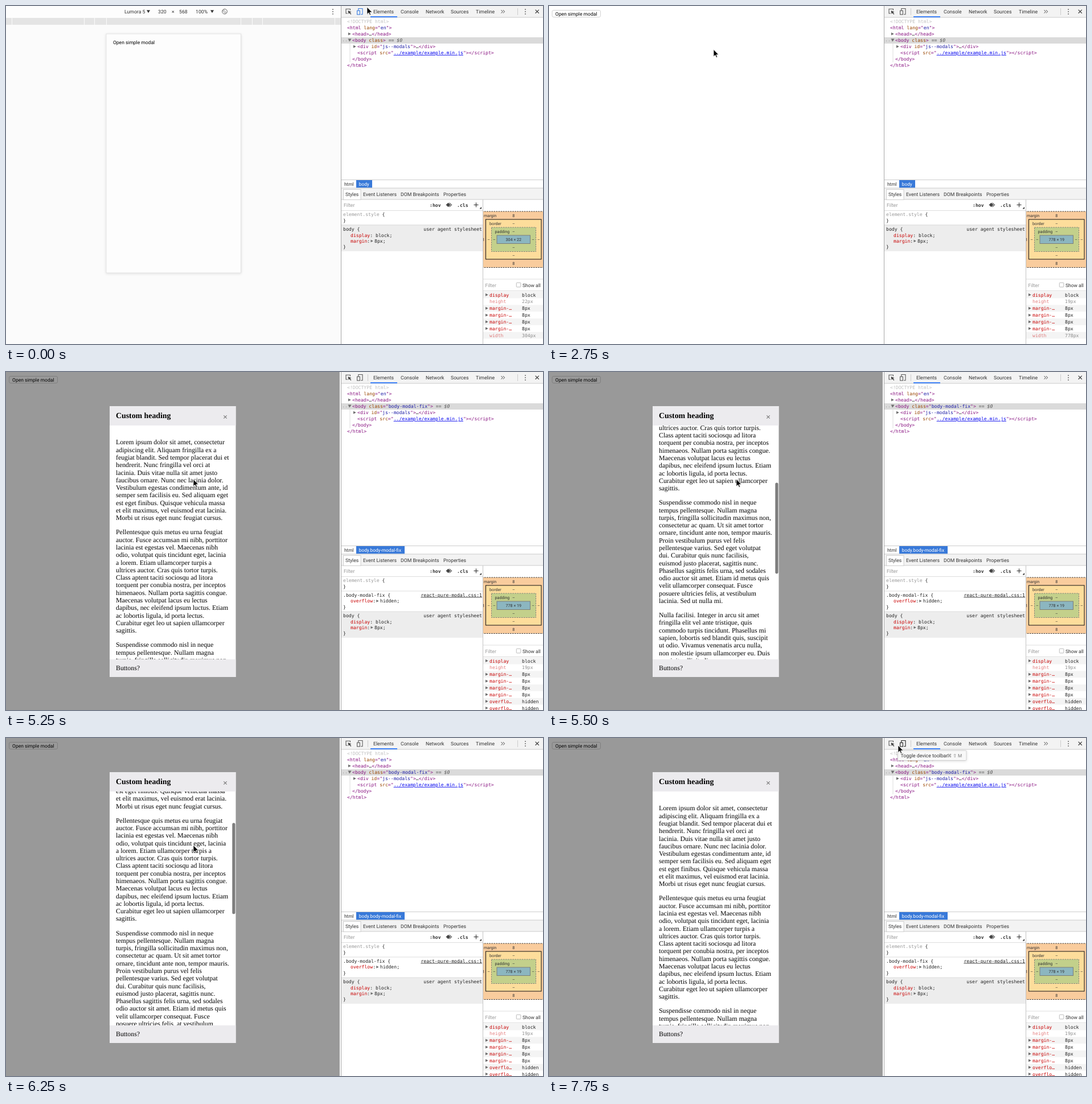
An HTML page that plays this animation: 943 px wide and 594 px high, repeating every 8 s.

```html
<!DOCTYPE html>
<html lang="en">
<head>
<meta charset="utf-8">
<title>Modal demo</title>
<style>
  html, body { margin: 0; width: 100%; height: 100%; overflow: hidden; background: #fff; }
  svg { display: block; width: 943px; height: 594px; }
  text { white-space: pre; text-rendering: geometricPrecision; font: 8.7px Roboto, "Liberation Sans", sans-serif; fill: #333; }
  .mono { font: 8.13px "DejaVu Sans Mono", "Liberation Mono", monospace; fill: #222; }
  .serif { font: 11.82px "Liberation Serif", "Noto Serif", serif; fill: #000; }
  .box { font-size: 7.2px; }
  .crumb { font-size: 8.3px; }
  .mid { text-anchor: middle; }
  .end { text-anchor: end; }
  .tag { fill: #881280; }
  .name { fill: #994500; }
  .val { fill: #1a1aa6; }
  .link { fill: #0000ee; text-decoration: underline; }
  .prop { fill: #c80000; }
  .dim { fill: #999; }
  .faint { fill: #c0c0c0; }
  .ital { fill: #555; font-style: italic; }
  .bold { font-weight: bold; }
</style>
</head>
<body>
<svg id="stage" viewBox="0 0 943 594"></svg>
<script>
const LOOP = 8000;
const ROW = 11.08, LINE = 13.29, GAP = 11.82, THUMB_RATIO = 2.515;

// [ms, x, y]
const CURSOR = [
  [0, 634, 2], [250, 616.5, 14], [500, 616.5, 13.5], [2500, 499.5, 60], [2750, 289, 76.5],
  [4250, 286.5, 76.5], [4500, 285.5, 76.5], [4750, 203.5, 54.5], [5000, 331, 174.5],
  [5250, 329, 188.5], [6750, 385.5, 147], [7000, 571.5, 38.5], [7250, 613, 13]
];
// [ms, offset]
const SCROLL = [[0, 0], [5500, 250], [5750, 598.7], [6000, 480], [6250, 136.7], [6500, 0]];

const PARAS = [
  `Lorem ipsum dolor sit amet, consectetur|adipiscing elit. Aliquam fringilla ex a|feugiat blandit. Sed tempor placerat dui et|hendrerit. Nunc fringilla vel orci at|lacinia. Duis vitae nulla sit amet justo|faucibus ornare. Nunc nec lacinia dolor.|Vestibulum egestas condimentum ante, id|semper sem facilisis eu. Sed aliquam eget|est eget finibus. Quisque vehicula massa|et elit maximus, vel euismod erat lacinia.|Morbi ut risus eget nunc feugiat cursus.`,
  `Pellentesque quis metus eu urna feugiat|auctor. Fusce accumsan mi nibh, porttitor|lacinia est egestas vel. Maecenas nibh|odio, volutpat quis tincidunt eget, lacinia|a lorem. Etiam ullamcorper turpis a|ultrices auctor. Cras quis tortor turpis.|Class aptent taciti sociosqu ad litora|torquent per conubia nostra, per inceptos|himenaeos. Nullam porta sagittis congue.|Maecenas volutpat lacus eu lectus|dapibus, nec eleifend ipsum luctus. Etiam|ac lobortis ligula, id porta lectus.|Curabitur eget leo ut sapien ullamcorper|sagittis.`,
  `Suspendisse commodo nisl in neque|tempus pellentesque. Nullam magna|turpis, fringilla sollicitudin maximus non,|consectetur ac quam. Ut sit amet tortor|ornare, tincidunt ante non, tempor mauris.|Proin vestibulum purus vel felis|pellentesque varius. Sed eget volutpat|dui. Curabitur quis nunc facilisis,|euismod justo placerat, sagittis nunc.|Phasellus sagittis felis urna, sed sodales|odio auctor sit amet. Etiam id metus quis|velit ullamcorper consequat. Fusce|posuere ultricies felis, at vestibulum|lacinia. Sed ut nulla mi.`,
  `Nulla facilisi. Integer in arcu sit amet|fringilla elit vel ante tristique, quis|commodo turpis tincidunt. Phasellus mi|sapien, lobortis sed blandit quis, suscipit|ut odio. Vivamus venenatis arcu nulla,|non molestie ipsum ullamcorper eu. Duis|suscipit sollicitudin purus, eu consequat|magna fringilla eget. Sed a varius dui.|Donec at nisi tortor. Vivamus ultrices|risus eu maximus fermentum. Curabitur|et tempus turpis. Curabitur tincidunt|porttitor imperdiet. Pellentesque hendrerit|finibus mi, et rhoncus ex vestibulum nec.|Integer fermentum quis elit eget faucibus.`,
  `Ut bibendum dolor a mi ultrices venenatis|ac a mi. Sed imperdiet ipsum sodales|odio scelerisque, vel lobortis est rutrum.|Sed sagittis iaculis lorem id mattis. Sed|ultricies condimentum rhoncus. Phasellus|rhoncus turpis nec odio egestas, quis|pellentesque quam aliquam. In sodales|erat iaculis libero molestie, vel commodo|nisl congue. Maecenas scelerisque, ligula|et elementum sagittis, felis dui semper|tortor, eget euismod enim enim vitae ante.|Nullam suscipit accumsan mi non blandit.|Curabitur viverra risus sed feugiat|aliquet. Pellentesque habitant morbi|tristique senectus et netus et malesuada|fames ac turpis egestas. Aliquam ipsum|diam, pulvinar sit amet lectus at, congue|vulputate eros. Donec id libero quam.`
];

const esc = s => s.replace(/&/g, '&amp;').replace(/</g, '&lt;').replace(/>/g, '&gt;');
const span = (cls, s) => `<tspan class="${cls}">${esc(s)}</tspan>`;
const tag = s => span('tag', s);
const raw = (x, y, inner, cls = '', more = '') => `<text x="${x}" y="${y}" class="${cls}" ${more}>${inner}</text>`;
const text = (x, y, s, cls, more) => raw(x, y, esc(s), cls, more);
const mono = (x, y, inner, cls = '') => raw(x, y, inner, 'mono ' + cls);
const rect = (x, y, w, h, fill, more = '') => `<rect x="${x}" y="${y}" width="${w}" height="${h}" fill="${fill}" ${more}/>`;
const path = (d, fill, more = '') => `<path d="${d}" fill="${fill}" ${more}/>`;
const hline = (x, y, w, c = '#ccc') => rect(x, y, w, 1, c);
const vline = (x, y, h, c = '#ccc') => rect(x, y, 1, h, c);
const right = (x, y, s = 5) => path(`M${x} ${y - s / 2}v${s}l${s * .95} ${-s / 2}z`, '#6e6e6e');
const down = (x, y, s = 6, c = '#6e6e6e') => path(`M${x} ${y - s / 2.4}h${s}l${-s / 2} ${s * .85}z`, c);
const dots = (x, c = '#555') => [6, 10, 14].map(y => rect(x - .8, y - .8, 1.6, 1.6, c)).join('');
const during = (from, to, inner) => `<g data-from="${from}" data-to="${to}">${inner}</g>`;

function devicePage() {
  const ticks = [10, 137, 155, 176, 412, 432, 450, 577];
  return rect(0, 0, 588, 594, '#fbfbfb') + rect(0, 0, 588, 20, '#fdfdfd') +
    text(208, 13, 'Lumora 5') + down(247, 9.7, 6, '#333') +
    text(267, 13, '320') + text(291, 13, '×') + text(304, 13, '568') +
    text(333, 13, '100%') + down(359, 9.7, 6, '#333') +
    `<circle cx="384" cy="9.7" r="4.4" fill="none" stroke="#666"/>` +
    path('M382 6.8l4.6 4.2l-1.6 1.6l-4.6 -4.2z', '#fdfdfd', 'stroke="#666" stroke-width=".8"') +
    dots(574) + rect(0, 21, 588, 12, '#e4e4e4') +
    ticks.map(x => vline(x, 21, 12, '#fafafa')).join('') +
    rect(176, 49, 236.5, 420, '#fdfdfd', 'stroke="#dcdcdc" stroke-width=".8" filter="url(#soft)"') +
    text(188, 66.6, 'Open simple modal', '', 'style="font-size:8.5px;fill:#000"');
}

const plainPage = () => rect(0, 0, 588, 594, '#fff') +
  rect(5.5, 7.5, 85, 12, '#fff', 'rx="2.5" stroke="#cfcfcf" stroke-width=".9"') +
  text(11, 16.6, 'Open simple modal', '', 'style="font-size:8.55px;fill:#000"');

function modal() {
  let y = 127.4, body = '';
  for (const para of PARAS) {
    for (const line of para.split('|')) {
      body += text(193, y.toFixed(2), line, 'serif');
      y += LINE;
    }
    y += GAP;
  }
  return rect(0, 0, 586, 594, '#000', 'opacity=".4"') +
    rect(182, 60, 221.5, 476, '#fff') +
    `<g clip-path="url(#view)"><g id="copy">${body}</g></g>` +
    rect(182, 60, 221.5, 34, '#ecebee') + rect(182, 505, 221.5, 31, '#ecebee') +
    text(193, 81, 'Custom heading', 'serif bold', 'style="font-size:13.83px"') +
    path('M382.3 76.3l5.4 5.4m0 -5.4l-5.4 5.4', 'none', 'stroke="#777" stroke-width="1.1"') +
    text(193, 524, 'Buttons?', 'serif') +
    during(5500, 7750, rect(397.3, 95, 5.2, 160, '#7d7d7d', 'rx="2.6" id="thumb"'));
}

function deviceIcon(c) {
  return path('M618.8 8V4.5h7.2v10.2h-3', 'none', `stroke="${c}" stroke-width="1.1"`) +
    rect(616.6, 8.2, 4.8, 6.8, '#f3f3f3', `stroke="${c}" stroke-width="1.1"`);
}

function toolbar() {
  const tabs = [[645, 'Elements'], [693, 'Console'], [737, 'Network'], [781, 'Sources'], [825, 'Timeline']];
  return rect(589, 0, 354, 20, '#f3f3f3') + hline(589, 19.5, 354) +
    path('M604.5 7.5V5.3h-7.5v7.7h3', 'none', 'stroke="#5a5a5a" stroke-width="1.1"') +
    path('M600.5 8l6 2.4l-2.3 1l2.2 2.6l-1.1 1l-2.2 -2.7l-1.5 1.8z', '#444') +
    during(0, 500, deviceIcon('#3b7de0')) + during(500, 1750, deviceIcon('#2f6cd0')) +
    during(1750, 2500, deviceIcon('#222')) + during(2500, 7250, deviceIcon('#5a5a5a')) +
    during(7250, LOOP, deviceIcon('#222')) +
    vline(635, 4, 12) + vline(898, 4, 12) + rect(640, 18, 47, 2, '#3e82f7') +
    tabs.map(([x, s]) => text(x, 13, s)).join('') +
    path('M869.5 7l2.7 2.8l-2.7 2.8m3.4 -5.6l2.7 2.8l-2.7 2.8', 'none', 'stroke="#444"') +
    dots(912) + path('M929.6 6.6l6.2 6.2m0 -6.2l-6.2 6.2', 'none', 'stroke="#444" stroke-width="1.3"');
}

const rowY = i => (29.8 + ROW * i).toFixed(2);
const attr = (name, value) => span('name', name) + tag('="') + span('val', value) + tag('"');

const domHead = () => mono(599, rowY(0), esc('<!DOCTYPE html>'), 'faint') +
  mono(599, rowY(1), tag('<html ') + attr('lang', 'en') + tag('>')) +
  right(601, 49) + mono(608, rowY(2), tag('<head>') + '…' + tag('</head>'));

const domOpen = cls => rect(589, 55, 354, 11, '#dadada') + mono(590, rowY(3) - 1, '...', 'dim') +
  vline(603.5, 66, 33, '#dedede') + down(600.5, 60) +
  mono(608, rowY(3), tag('<body ') + (cls ? attr('class', cls) : span('name', 'class')) + tag('>') + span('ital', ' == $0')) +
  right(610, 71.2) + mono(617, rowY(4), tag('<div ') + attr('id', 'js--modals') + tag('>') + '…' + tag('</div>')) +
  mono(617, rowY(5), tag('<script ') + span('name', 'src') + tag('="') +
    span('link', '../example/example.min.js') + tag('"></' + 'script>')) +
  mono(608, rowY(6), tag('</body>')) + mono(599, rowY(7), tag('</html>'));

const domClosed = () => right(601, 60) +
  mono(608, rowY(3), tag('<body ') + attr('class', 'body-modal-fix') + tag('>') + '…' + tag('</body>')) +
  mono(599, rowY(4), tag('</html>'));

const crumbs = (label, w) => text(594, 315.6, 'html', 'crumb') + rect(615, 306, w, 13.5, '#3879d9') +
  text(619.8, 315.6, label, 'crumb', 'style="fill:#fff"');

function panes() {
  const tabs = [[596, 'Styles'], [627, 'Event Listeners'], [693, 'DOM Breakpoints'], [768, 'Properties']];
  return hline(589, 305, 354) + rect(589, 320, 354, 20, '#f3f3f3') + hline(589, 319.5, 354) + hline(589, 339.5, 354) +
    rect(592.5, 322.5, 30.5, 18, '#fff', 'stroke="#ccc" stroke-width=".9"') +
    tabs.map(([x, s]) => text(x, 334, s)).join('') +
    text(593, 353, 'Filter', 'dim') + hline(589, 359, 248, '#ddd') +
    path('M772.5 349.5l4 -3.7l4 3.7l-4 3.7z', '#444') + path('M777.5 345.8l2 0l4 3.7l-4 3.7l-2 0l3.7 -3.7z', '#777') +
    vline(837, 340, 254, '#c4c4c4');
}

const filterTools = c => mono(744, 352.5, `<tspan style="fill:${c}">:hov</tspan>`, 'bold') +
  mono(792, 352.5, `<tspan style="fill:${c}">.cls</tspan>`, 'bold') +
  path('M821.5 349.5h8m-4 -4v8', 'none', `stroke="${c}" stroke-width="1.1"`) + path('M835 353v3.5h-3.5z', c);

const decl = (y, name, value, nested) => mono(605, y, span('prop', name) + ':' + (nested ? '' : ' ' + value + ';')) +
  (nested ? right(640.5 + (name.length - 6) * 4.9, y - 3, 4.6) + mono(647 + (name.length - 6) * 4.9, y, value + ';') : '');

function rules(fixed) {
  const y = fixed ? 36 : 0;
  return mono(592, 369, span('dim', 'element.style') + ' {') + mono(592, 379.6, '}') + hline(589, 384.5, 248, '#ddd') +
    (fixed ? mono(592, 394.6, '.body-modal-fix {') +
      mono(836, 394.6, 'react-pure-modal.css:1', 'end" text-decoration="underline') +
      decl(405.4, 'overflow', 'hidden', true) + mono(592, 416, '}') : '') +
    rect(589, 385 + y, 248, 46, '#ededed') + hline(589, 384.5 + y, 248, '#ddd') +
    mono(592, 394.8 + y, 'body {') + mono(836, 394.8 + y, 'user agent stylesheet', 'end') +
    decl(405.6 + y, 'display', 'block') + decl(416 + y, 'margin', '8px', true) + mono(592, 426.4 + y, '}');
}

function boxModel() {
  const mid = (x, y, s) => text(x, y, s, 'box mid');
  const dash = c => `stroke="${c}" stroke-width=".9" stroke-dasharray="2.5 1.6"`;
  return `<g clip-path="url(#side)">` + rect(836, 361, 120, 98.5, '#f9cc9d', dash('#222')) +
    rect(842.5, 375, 97.5, 70, '#fddd9b', 'stroke="#111"') +
    rect(852.5, 389, 78, 42.5, '#c3d08b', dash('#777')) +
    rect(862, 403, 58.5, 14.5, '#8cb6c0', 'stroke="#777" stroke-width=".9"') +
    text(839, 371, 'margin', 'box') + text(849, 385, 'border', 'box') + text(858.5, 399, 'padding', 'box') +
    mid(891.3, 371, '8') + mid(891.3, 455.3, '8') + mid(837.8, 413, '8') +
    [384.5, 398.5, 426.5, 440.5].map(y => mid(891.3, y, '–')).join('') +
    [847.5, 857.3, 925.5, 935.3].map(x => mid(x, 412.5, '–')).join('') + '</g>' +
    hline(838, 479.5, 105, '#ddd') + text(841.5, 493.5, 'Filter', 'dim') +
    rect(896.3, 486.3, 7.6, 7.6, '#fff', 'rx="1" stroke="#aaa" stroke-width=".8"') +
    text(907, 493.5, 'Show all', '', 'style="font-size:8.5px"') + hline(838, 500, 105, '#ddd');
}

function computed(w, h, last) {
  const margin = ['margin-…', '8px'];
  const rows = [['display', 'block'], ['height', h + 'px', 1], margin, margin, margin, margin, ...last(w)];
  return rows.map(([name, value, pale], i) => {
    const y = 507.6 + i * 11.85;
    return (i % 2 ? '' : rect(838, y - 5.9, 105, 11.8, '#f4f4f4')) + (pale ? '' : right(842, y)) +
      `<g opacity="${pale ? .5 : 1}">` + mono(849, y + 3, span('prop', name), pale ? '' : 'strong') +
      mono(906, y + 3, value) + '</g>';
  }).join('');
}
const widthRow = w => [['width', w + 'px', 1]];
const overflowRows = () => [['overflo…', 'hidden'], ['overflo…', 'hidden']];
const size = s => text(891.3, 413, s, 'box mid');

const tooltip = () => rect(612.5, 22, 120.5, 17.5, '#f8f8f8', 'rx="1.5" stroke="#c6c6c6" stroke-width=".8" filter="url(#soft)"') +
  text(617.5, 33.6, 'Toggle device toolbar') +
  text(699, 33.6, '⌘ ⇧ M', '', 'style="font-size:8.2px;fill:#777;font-family:Roboto,\'DejaVu Sans\',sans-serif"');

const stage = document.getElementById('stage');
stage.innerHTML = `<defs>
  <clipPath id="view"><rect x="182" y="94" width="221.5" height="411"/></clipPath>
  <clipPath id="side"><rect x="838" y="341" width="105" height="138"/></clipPath>
  <filter id="soft" x="-10%" y="-30%" width="120%" height="180%"><feDropShadow dx="0" dy="1" stdDeviation="2" flood-opacity=".13"/></filter>
  </defs>` +
  rect(0, 0, 943, 594, '#fff') +
  during(0, 1750, devicePage()) + during(1750, LOOP, plainPage()) + during(4250, LOOP, modal()) +
  vline(588, 0, 594, '#a8a8a8') + toolbar() + domHead() +
  during(0, 4250, domOpen('') + crumbs('body', 28) + rules(false)) +
  during(4250, 4500, domClosed()) +
  during(4500, LOOP, domOpen('body-modal-fix') + crumbs('body.body-modal-fix', 85) + rules(true)) +
  panes() + during(0, 4250, filterTools('#333')) + during(4250, 4500, filterTools('#999')) +
  during(4500, LOOP, filterTools('#333')) + boxModel() +
  during(0, 1750, size('304 × 22') + computed(304, 22, widthRow)) +
  during(1750, LOOP, size('778 × 19')) + during(1750, 4250, computed(778, 19, widthRow)) +
  during(4500, LOOP, computed(778, 19, overflowRows)) +
  during(7250, LOOP, tooltip()) +
  `<g id="cursor">${path('M0 0V12.4L2.9 9.7L4.8 14L6.6 13.2L4.8 9.1H8.8Z', '#000', 'stroke="#fff" stroke-width=".7"')}</g>`;

const parts = [...stage.querySelectorAll('[data-from]')];
const find = id => document.getElementById(id);
const cursor = find('cursor'), copy = find('copy'), thumb = find('thumb');
const at = (steps, t) => steps.filter(s => s[0] <= t).pop();

function draw(t) {
  for (const p of parts) {
    p.style.display = t >= +p.dataset.from && t < +p.dataset.to ? '' : 'none';
  }
  const [, x, y] = at(CURSOR, t), [, offset] = at(SCROLL, t);
  cursor.setAttribute('transform', `translate(${x} ${y})`);
  copy.setAttribute('transform', `translate(0 ${-offset})`);
  thumb.setAttribute('y', 95 + offset / THUMB_RATIO);
}

const start = performance.now();
function tick() {
  draw((performance.now() - start) % LOOP);
  requestAnimationFrame(tick);
}
tick();
</script>
</body>
</html>
```
